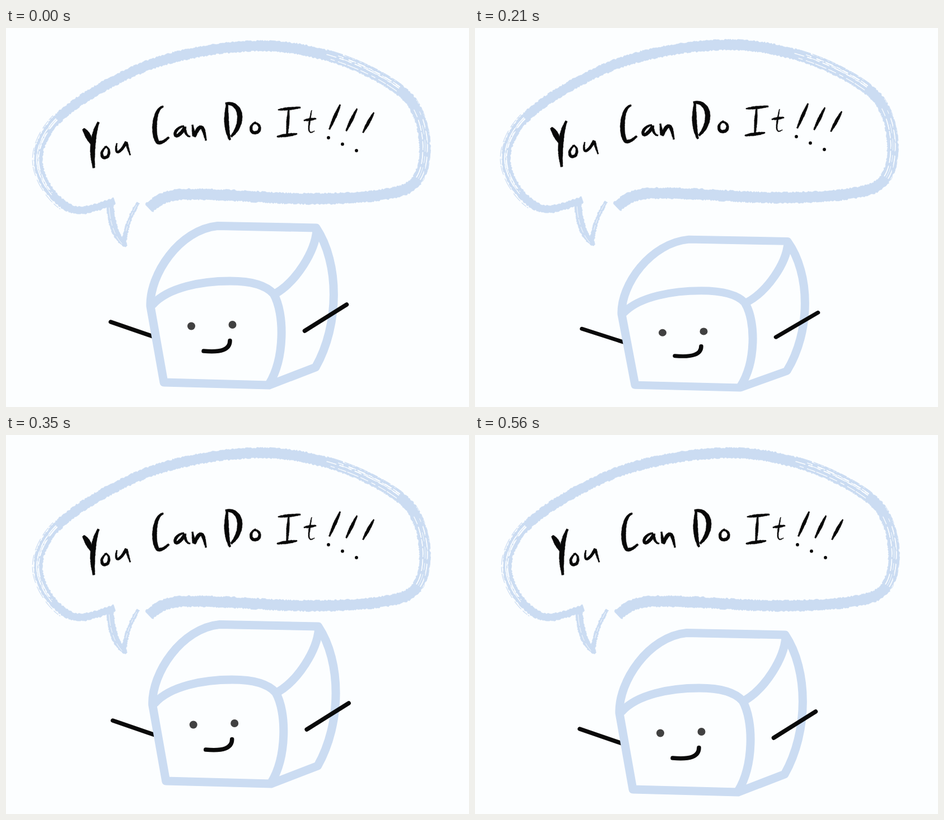
These frames come from a looping animation (827 by 677 pixels, 0.63 s). An HTML page:

```html
<!DOCTYPE html>
<html lang="en">
<head>
<meta charset="utf-8">
<title>You Can Do It!!!</title>
<style>
  html, body { margin: 0; width: 100%; height: 100%; overflow: hidden; background: #fcfeff; }
  svg { display: block; width: 100%; height: 100%; }
  .box { fill: none; stroke: #cbdcf2; stroke-width: 15; stroke-linecap: round; stroke-linejoin: round; }
  .line { fill: none; stroke: #0a0a0a; stroke-width: 7.5; stroke-linecap: round; }
</style>
</head>
<body>
<svg viewBox="0 0 827 677" role="img" aria-label="You Can Do It!!!">
  <g id="speech"></g>
  <g id="cube">
    <path class="line" d="M187 525L264 551.5"/>
    <g class="box">
      <path d="M258 497C256 440 310 360 378 353.5L554 357C596 420 596 530 553 606L470 638L282 633Z"/>
      <path d="M262 494C290 463 350 452 400 452C440 452 465 460 478 475C498 510 498 590 470 636"/>
      <path d="M555 361C552 400 518 453 482 474"/>
    </g>
    <path class="line" d="M533.5 541L608.5 494"/>
    <g fill="#414141">
      <circle cx="331" cy="532.5" r="7"/>
      <circle cx="404.5" cy="530" r="7"/>
    </g>
    <path class="line" d="M353 577C385 580 400 574 400 558.5"/>
  </g>
</svg>
<script>
const BLUE = '#cbdcf2', PAPER = '#fcfeff', INK = '#080808';
const speech = document.getElementById('speech');
const cube = document.getElementById('cube');

let seed = 7;
const rand = () => (seed = seed * 16807 % 2147483647) / 2147483647;
const between = (a, b) => a + (b - a) * rand();

function make(tag, attrs) {
  const el = document.createElementNS('http://www.w3.org/2000/svg', tag);
  for (const k in attrs) el.setAttribute(k, attrs[k]);
  return el;
}
const add = (tag, attrs) => speech.append(make(tag, attrs));
const toPath = pts => 'M' + pts.map(p => p.map(v => v.toFixed(1)).join(' ')).join('L');

// Points along a path from fraction a to b, each with its unit normal.
function walk(d, a = 0, b = 1, gap = 2) {
  const path = make('path', { d }), len = path.getTotalLength();
  const n = Math.ceil((b - a) * len / gap);
  return Array.from({ length: n + 1 }, (_, i) => {
    const u = a + (b - a) * i / n, s = u * len;
    const { x, y } = path.getPointAtLength(s);
    const p = path.getPointAtLength(s - 1), q = path.getPointAtLength(s + 1);
    const dx = q.x - p.x, dy = q.y - p.y, l = Math.hypot(dx, dy) || 1;
    return { u, x, y, nx: -dy / l, ny: dx / l };
  });
}
const shift = (p, off) => [p.x + p.nx * off, p.y + p.ny * off];

// A rough-edged stroke whose width follows width(u).
function brush(d, width, color, rough) {
  const pts = walk(d);
  const side = s => pts.map(p => shift(p, s * width(p.u) / 2 + between(-rough, rough)));
  add('path', { d: toPath([...side(1), ...side(-1).reverse()]) + 'Z', fill: color,
    stroke: color, 'stroke-width': .5, 'stroke-linejoin': 'round' });
}

// A broken hair running beside a stroke.
function bristle(d, a, b, off, color) {
  const dash = Array.from({ length: 8 }, (_, i) => (i % 2 ? between(2, 10) : between(6, 24)).toFixed(1));
  add('path', { d: toPath(walk(d, a, b).map(p => shift(p, off))), fill: 'none', stroke: color,
    'stroke-width': between(.8, 1.5).toFixed(1), 'stroke-dasharray': dash.join(' ') });
}

const outline = `M255 322C275 303 295 297 320 297C420 297 460 305 545 305
  C620 305 675 300 705 291C738 282 748 252 748 212C748 180 735 138 712 118
  C660 75 560 32 455 32C390 32 310 45 245 70C185 95 115 135 85 170
  C62 197 50 230 62 260C70 285 100 326 132 326C152 325 170 317 194 309`;
const tailDown = 'M186 312C186 345 196 375 215 390';
const tailUp = 'M211 386Q213 350 236 312';

brush(outline, u => 19 - 7 * u ** 5, BLUE, 1.2);
for (const [a, b] of [[.31, .4], [.42, .51], [.83, .94]]) {
  for (let i = 0; i < 5; i++) bristle(outline, a, b - .03 * rand(), between(-5, 6), PAPER);
  bristle(outline, a, b, 10, BLUE);
}
brush(tailDown, u => 13 - 9 * u ** 6, BLUE, 1);
brush(tailUp, u => 8 - 2 * u, BLUE, 1);
bristle(tailDown, .1, .9, 2, PAPER);
bristle(tailUp, .3, .95, 0, PAPER);

// Ink strokes: path and fullest width.
const letters = [
  ['M138 180Q146 189 152 206', 10], ['M165 168Q150 204 157 250', 9],
  ['M180 211Q167 221 173 231Q184 234 184 220Q183 212 176 212', 5],
  ['M198 206C192 232 206 222 215 203Q217 214 222 227', 5],
  ['M281 140C260 145 263 207 274 205Q282 204 291 195', 8],
  ['M318 175C298 179 298 201 311 189Q318 182 319 176Q320 193 329 194', 6],
  ['M333 173L336 194Q345 172 351 179Q354 184 357 201', 6.5],
  ['M395 136Q391 175 400 200', 8], ['M392 135C422 131 426 172 402 194', 9],
  ['M446 168C434 174 436 188 445 187C456 187 456 170 444 170', 5.5],
  ['M486 146L526 142', 5], ['M505 145L502 191', 5], ['M484 194L520 189', 5.5],
  ['M546 147C540 175 537 193 551 184', 2.5], ['M532 165L554 162', 4.5]
];
const ink = (d, w) => brush(d, u => w * (.4 + .6 * Math.sin(Math.PI * u)), INK, .3);

letters.forEach(([d, w]) => ink(d, w));
for (let i = 0; i < 3; i++) {
  ink(`M${597 + 30 * i} ${137 + 7 * i}l-19.5 ${44 - 4 * i}`, 5.5);
  add('circle', { cx: 576 + 25 * i, cy: 196 + 11.5 * i, r: 2.9, fill: INK });
}

// Bounce: two squashes, then two hops, back to rest between each.
const STEP = 70;
const beats = ['squash', 'squash', 'hop', 'hop'];
const poses = {
  rest: ['', ''],
  squash: ['translate(-2 -2)', 'matrix(1 0 0 .931 4 48.5)'],
  hop: ['', 'translate(3.7 -15)']
};

function draw(ms) {
  const step = Math.floor(ms / STEP) % (2 * beats.length + 1);
  const [s, c] = poses[step % 2 ? beats[(step - 1) / 2] : 'rest'];
  speech.setAttribute('transform', s);
  cube.setAttribute('transform', c);
}

let start;
function tick(now) {
  start ??= now;
  draw(now - start);
  requestAnimationFrame(tick);
}
draw(0);
requestAnimationFrame(tick);
</script>
</body>
</html>
```
